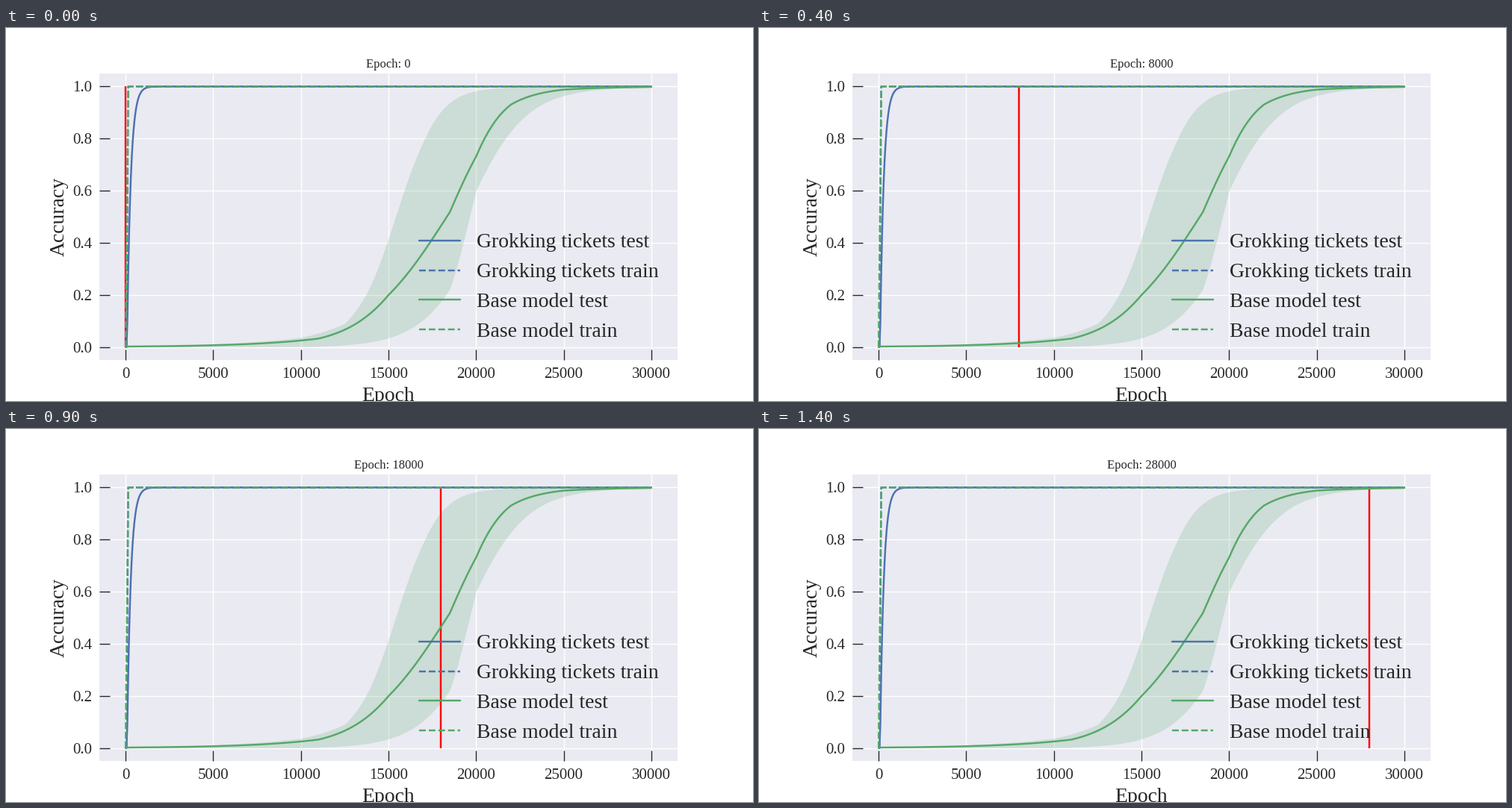
Recreate the animation shown at these times as a matplotlib script. Size 1000x500 px, loop 1500 ms.

```python
import numpy as np
import matplotlib.pyplot as plt
from matplotlib.animation import FuncAnimation

FRAMES, INTERVAL, EPOCHS_PER_FRAME = 15, 100, 2000
BLUE, GREEN, INK, PANEL = "#4C72B0", "#55A868", "0.15", "#EAEAF2"

plt.rcParams.update({
    "font.family": "Liberation Serif",
    "text.color": INK,
    "axes.labelcolor": INK,
    "axes.facecolor": PANEL,
    "axes.edgecolor": "white",
    "axes.linewidth": 0,
    "axes.axisbelow": True,
    "axes.grid": True,
    "axes.labelsize": 20,
    "axes.titlesize": 12,
    "grid.color": "white",
    "grid.linewidth": 1,
    "legend.fontsize": 20,
    "legend.frameon": False,
    "legend.labelspacing": 0.52,
    "lines.linewidth": 1.75,
    "lines.solid_capstyle": "round",
})
for axis in ("xtick", "ytick"):
    plt.rcParams.update({
        f"{axis}.color": INK,
        f"{axis}.direction": "in",
        f"{axis}.labelsize": 15,
        f"{axis}.major.size": 10,
        f"{axis}.major.width": 1,
        f"{axis}.major.pad": 7,
    })

epochs = np.arange(0, 30001, 50)


def growth(*knots):
    """Logistic curve whose logit is piecewise linear in thousands of epochs."""
    x, logit = zip(*knots)
    return 1 / (1 + np.exp(-np.interp(epochs / 1000, x, logit)))


def ramp(start, end):
    return np.clip((epochs - start) / (end - start), 0, 1)


ticket_test = 1 - np.exp(-np.maximum(epochs - 80, 0) / 210)
ticket_train = ramp(50, 150)
base_train = ramp(0, 150)
base_test = growth((0, -6.3), (11, -3.4), (15, -1.39), (18.5, 0.07),
                   (20, 1), (22, 2.6), (25, 4.4), (30, 6.2))
band_top = growth((0, -6.5), (5, -4.4), (10, -3.26), (12.5, -2.3),
                  (14, -1.16), (17, 1.32), (20, 4.1), (25, 8))
band_bottom = growth((0, -9), (10, -6.5), (13, -4.5), (18.5, -1.25),
                     (20, 0.41), (24, 2.75), (28, 4.97), (30, 5.8))

fig, ax = plt.subplots(figsize=(10, 5), dpi=100)
fig.patch.set_facecolor("white")
fig.subplots_adjust(left=0.1249, right=0.8991, bottom=0.1098, top=0.8782)

ax.plot(epochs, ticket_test, color=BLUE, label="Grokking tickets test")
ax.plot(epochs, ticket_train, "--", color=BLUE, label="Grokking tickets train")
ax.plot(epochs, base_test, color=GREEN, label="Base model test")
ax.plot(epochs, base_train, "--", color=GREEN, label="Base model train")
ax.fill_between(epochs, band_bottom, band_top, color=GREEN, alpha=0.2, linewidth=0)
marker, = ax.plot([0, 0], [0, 1], color="red", solid_capstyle="butt", zorder=1.9)

ax.set(xlim=(-1500, 31500), ylim=(-0.05, 1.05))
ax.set_xlabel("Epoch", labelpad=5)
ax.set_ylabel("Accuracy")
ax.set_xticks(range(0, 30001, 5000))
ax.set_yticks(np.linspace(0, 1, 6))
ax.legend(loc="lower right")
title = ax.set_title("Epoch: 0")


def update(frame):
    epoch = frame * EPOCHS_PER_FRAME
    marker.set_xdata([epoch, epoch])
    title.set_text(f"Epoch: {epoch}")
    return marker, title


anim = FuncAnimation(fig, update, frames=FRAMES, interval=INTERVAL,
                     repeat=True, repeat_delay=0, blit=False)
plt.show()
```
